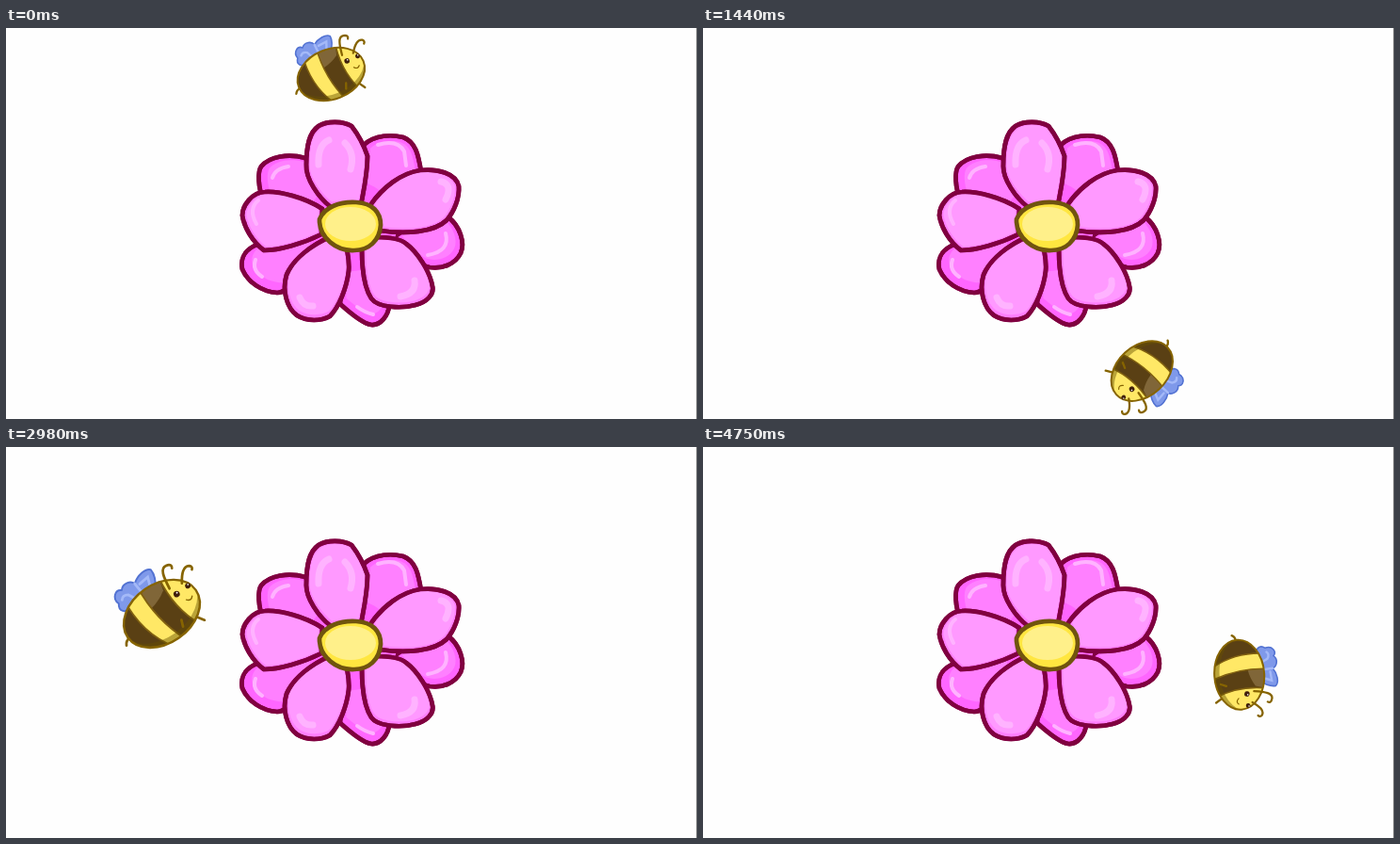
These frames come from a looping animation (734x415 px, 4.77 s). An HTML page:

```html
<!DOCTYPE html>
<html lang="en">
<head>
<meta charset="utf-8">
<title>Bee around a flower</title>
<style>
  html, body { margin: 0; width: 100%; height: 100%; overflow: hidden; background: #fefefe; }
  svg { display: block; width: 100vw; height: 100vh; }
  .petal, .line { stroke: #800040; stroke-width: 4.7; stroke-linejoin: round; }
  .line { fill: none; }
  .back { fill: #ff66ff; }
  .front { fill: #ff80ff; }
  .inner { transform-box: fill-box; transform-origin: 55% 35%; }
  .back-in { fill: #ff80ff; transform: scale(.78); }
  .front-in { fill: #ff99ff; transform: scale(.9); }
  .shine { fill: none; stroke: #ffb3ff; stroke-width: 7; stroke-linecap: round; stroke-linejoin: round; }
  .shine.thin { stroke-width: 4; }
  .limb { fill: none; stroke: #866400; stroke-width: 2.3; stroke-linecap: round; }
  .seam { fill: none; stroke: #806010; stroke-width: 1.5; }
</style>
</head>
<body>
<svg viewBox="0 0 734 415" preserveAspectRatio="none">
  <defs>
    <path id="tl" d="M318 138C300 133 280 136 271 147C267 153 268 170 273 181L345 195V185Z"/>
    <path id="tr" d="M380 124C392 113 410 113 422 116C435 121 438 134 441 153L385 190H375Z"/>
    <path id="r" d="M470 201C482 210 488 228 483 239C477 251 463 256 450 254C440 252 425 240 412 222L450 195Z"/>
    <path id="b" d="M355 293C365 302 380 314 388 315C398 316 406 305 407 295L385 236L355 240Z"/>
    <path id="ll" d="M264 231C252 237 249 247 251 256C257 270 272 280 288 281C293 281 296 279 299 275L340 225V205Z"/>
    <path id="top" d="M345 190C332 180 318 160 319 145C319 125 322 111 332 104C342 98 358 99 367 104C374 113 380 124 384 136C384 155 380 172 377 188Z"/>
    <path id="right" d="M387 188C400 169 420 154 440 151C458 149 478 154 481 168C482 180 476 195 468 204C455 217 425 219 397 215Z"/>
    <path id="left" d="M336 192C318 180 290 173 275 174C262 174 251 188 251 199C253 212 262 227 274 236C290 236 315 229 335 219Z"/>
    <path id="lowl" d="M346 221C325 230 305 245 298 262C293 278 298 297 309 305C320 312 335 311 344 306C354 296 362 275 364 258C365 248 363 240 362 234Z"/>
    <path id="lowr" d="M378 234C378 255 380 275 388 287C395 297 420 298 435 294C447 291 455 283 453 274C450 258 437 238 425 229C418 223 405 222 393 222Z"/>
    <ellipse id="torso" rx="37" ry="26.5" transform="rotate(-12)"/>
    <clipPath id="skin"><use href="#torso"/></clipPath>
  </defs>

  <g id="flower"></g>
  <g class="shine">
    <path d="M360 122Q371 133 366 150"/>
    <path d="M343 119Q331 124 332 145"/>
    <path d="M462 163Q475 166 467 182"/>
    <path d="M312 286Q316 296 326 295"/>
    <path d="M434 268Q436 282 419 285"/>
  </g>
  <g class="shine thin">
    <path d="M283 159Q286 149 300 147"/>
    <path d="M395 124Q416 118 423 131L425 146"/>
    <path d="M467 218Q472 237 448 241"/>
    <path d="M265 246Q261 257 272 264"/>
    <path d="M268 183Q257 192 266 208"/>
    <path d="M373 296Q381 302 390 304"/>
  </g>
  <path d="M333 203C338 190 355 184 372 185C390 186 398 196 398 209C397 226 385 236 370 236C350 237 334 222 333 206Z" fill="#ffe640" stroke="#70540e" stroke-width="4.7"/>
  <ellipse cx="366" cy="208" rx="27" ry="18" fill="#fff08a"/>

  <g id="bee">
    <path d="M-22-16C-30-12-35-17-32-23C-36-30-30-36-25-33C-22-39-14-38-12-34C-7-40 2-43 6-40C8-34 6-28 3-22Z" fill="#7f99ea" stroke="#5272d2" stroke-width="1.6" stroke-linejoin="round"/>
    <path d="M-28-25Q-26-29-21-27L-17-22M-8-32L1-35L0-28M-12-34L-9-24" fill="none" stroke="#a4b9f8" stroke-width="2.4" stroke-linecap="round"/>
    <path class="limb" d="M-35 9Q-39 10-40 14M26 13L33 20"/>
    <g clip-path="url(#skin)">
      <rect x="-45" y="-45" width="90" height="90" fill="#ffe866"/>
      <g transform="rotate(-9)">
        <path d="M-22-30Q-25 6-5 32H-50V-30Z" fill="#5a4014"/>
        <path d="M-6-32Q-8 2 7 32H28Q10 4 15-32Z" fill="#5a4014"/>
        <path d="M-6-32Q-7-18-5-9Q4-11 12-17L15-32Z" fill="#806638"/>
        <path class="seam" d="M-22-30Q-25 6-5 32M-6-32Q-8 2 7 32M15-32Q10 4 28 32"/>
      </g>
      <path d="M-45-45H45V45H-45ZM-39 4A39 27 -14 0 0 37-13A39 27 -14 0 0-39 4" fill="#665000" fill-opacity=".45" fill-rule="evenodd"/>
    </g>
    <use href="#torso" fill="none" stroke="#866400" stroke-width="2"/>
    <path class="limb" d="M15-18C14-30 14-38 20-38C24-38 25-36 24-34M27-18C30-26 34-32 39-30C41-29 41-27 40-26M14 12L13 18"/>
    <g fill="#40200c">
      <circle cx="19" cy="-11" r="2.8"/>
      <circle cx="31" cy="-14" r="2.4"/>
    </g>
    <g fill="#fff">
      <circle cx="19.7" cy="-12" r=".8"/>
      <circle cx="31.5" cy="-15" r=".7"/>
    </g>
    <path d="M25-3Q29 0 31-4" fill="none" stroke="#866400" stroke-width="1.2" stroke-linecap="round"/>
  </g>
  <path d="M733.5 0V415" stroke="#999" stroke-width="1"/>
</svg>
<script>
  const LOOP = 4770, LAP = 3930;
  const { sin, cos, exp, PI } = Math;

  const use = (id, cls) => `<use href="#${id}" class="${cls}"/>`;
  const petals = (ids, kind) => ids.split(" ").map(id =>
    use(id, `petal ${kind}`) + use(id, `inner ${kind}-in`) + use(id, "line")).join("");
  document.getElementById("flower").innerHTML =
    petals("tl tr r b ll", "back") +
    '<circle cx="367" cy="210" r="48" class="back"/>' +
    petals("right left lowl lowr top", "front");

  // Waypoints of the closed flight path, evenly spaced in time
  const way = [
    [345, 49], [450, 86], [590, 158], [567, 249], [527, 352], [474, 364], [413, 357],
    [347, 343], [268, 308], [276, 280], [318, 238], [88, 140], [163, 82], [253, 65]
  ];

  // Catmull-Rom spline through the waypoints, u from 0 to 1
  function place(u) {
    const n = way.length, i = Math.floor(u * n), s = u * n - i;
    const [a, b, c, d] = [-1, 0, 1, 2].map(k => way[(i + k + n) % n]);
    return [0, 1].map(k => b[k] + s / 2 * (c[k] - a[k] +
      s * (2 * a[k] - 5 * b[k] + 4 * c[k] - d[k] + s * (3 * (b[k] - c[k]) + d[k] - a[k]))));
  }

  // One full turn per lap, with a gentle sway
  function heading(u) {
    const a = 2 * PI * u;
    return 360 * u + 28 - 20.5 * cos(a) - 21 * sin(a) - 17.6 * cos(2 * a) + 10.7 * sin(2 * a);
  }

  // The bee comes closer at the lower left
  const size = u => 1 + 0.4 * exp(-(((u - 0.655) / 0.12) ** 2));

  const bee = document.getElementById("bee");
  const start = performance.now();

  function draw(now) {
    const t = Math.max(0, now - start) % LOOP;
    const u = t % LAP / LAP;
    bee.setAttribute("transform",
      `translate(${place(u)}) rotate(${heading(u)}) scale(${size(u)})`);
    requestAnimationFrame(draw);
  }
  draw(start);
</script>
</body>
</html>
```
